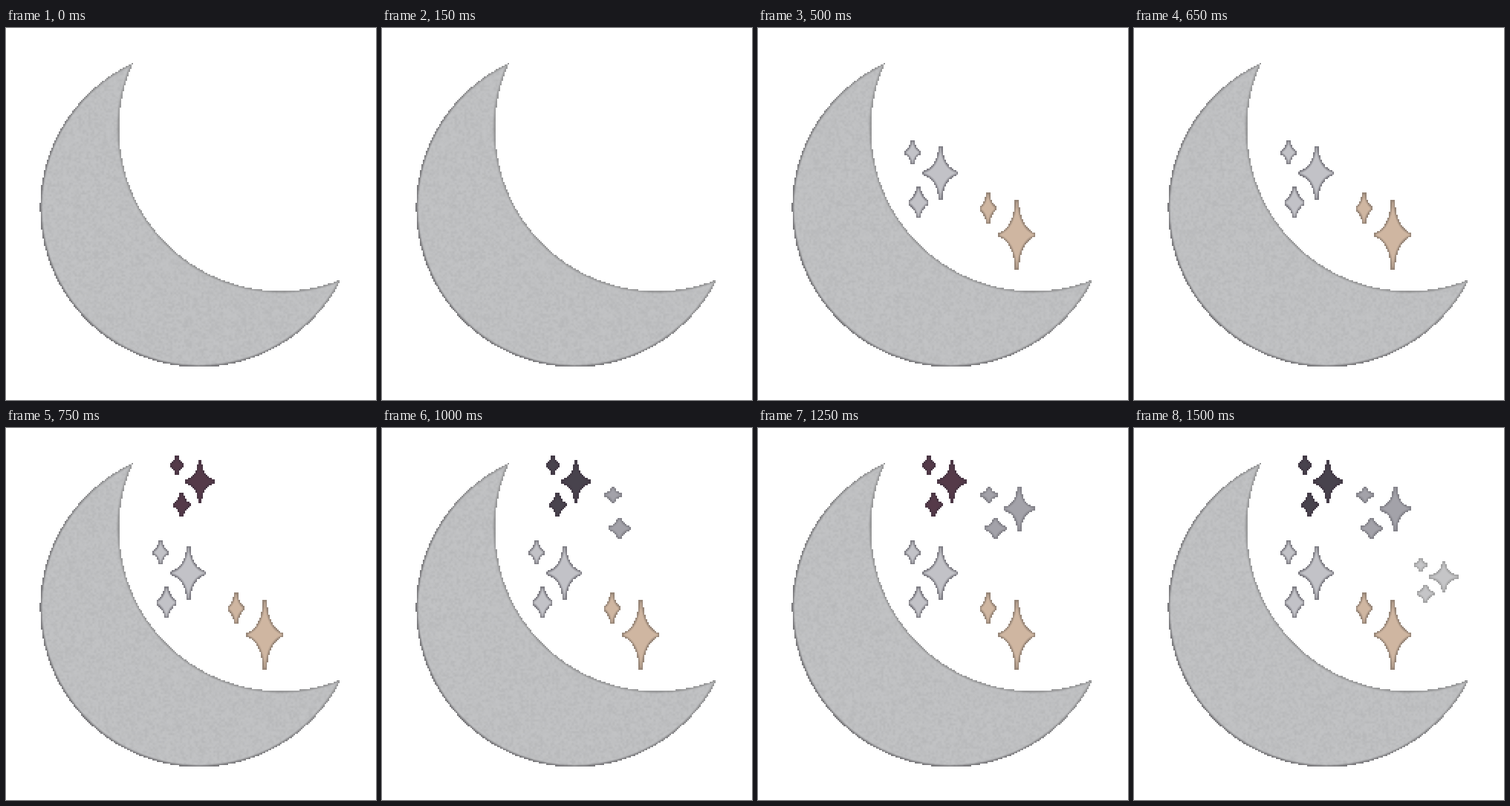
An HTML page with a canvas for the animation above (1.75 s loop, 498 by 500 pixels).

```html
<!DOCTYPE html>
<html lang="en">
<head>
<meta charset="utf-8">
<title>Moon and stars</title>
<style>
html, body { margin: 0; width: 100%; height: 100%; overflow: hidden; background: #fff; }
canvas { display: block; }
</style>
</head>
<body>
<canvas id="sky" width="498" height="500"></canvas>
<script>
const sky = document.getElementById('sky');
const ctx = sky.getContext('2d');
const STEP = 250, STEPS = 7, CELL = 2;

// Paper-cut shapes have stepped edges: cover the path with square cells.
function stepped(path, x0, y0, x1, y1) {
  const cells = new Path2D();
  const snap = v => Math.floor(v / CELL) * CELL - 1;
  for (let y = snap(y0); y <= y1; y += CELL) {
    for (let x = snap(x0); x <= x1; x += CELL) {
      if (ctx.isPointInPath(path, x + 1, y + 1)) cells.rect(x, y, CELL, CELL);
    }
  }
  return cells;
}

// Four blunt points joined by hollow sides; a larger pinch gives a fuller star.
function star(x, y, w, h, pinch) {
  const path = new Path2D();
  const tip = 2.5, cx = pinch * w, cy = pinch * h;
  path.moveTo(x + tip, y - h);
  for (const [sx, sy] of [[1, -1], [1, 1], [-1, 1], [-1, -1]]) {
    const side = [x + sx * w, y + sy * tip], end = [x + sx * tip, y + sy * h];
    const [from, to] = sx * sy < 0 ? [end, side] : [side, end];
    path.lineTo(...from);
    path.quadraticCurveTo(x + sx * cx, y + sy * cy, ...to);
  }
  path.closePath();
  return { path, cells: stepped(path, x - w, y - h, x + w, y + h) };
}

// A large star with small companions to its upper and lower left.
function cluster({ step, delay = 0, x, y, w, h, spreadX = w, spreadY = h, small = 2, ...look }) {
  const add = (at, ...shape) => ({ step: at, ...look, ...star(...shape) });
  const list = [add(step + delay, x, y, w, h, 0.2)];
  for (let i = 0; i < small; i++) {
    const dx = 1.56 - 0.33 * i, dy = 1.87 * i - 0.77, size = 0.45 + 0.13 * i;
    list.push(add(step, x - dx * spreadX, y + dy * spreadY, size * spreadX, size * spreadY, 0.36));
  }
  return list;
}

const plum = step => step % 2 ? '#553a49' : '#48434d';
const stars = [
  { step: 1, x: 245.5, y: 195, w: 24, h: 36, fill: '#c2c2c7', edge: '#3c3843' },
  { step: 2, x: 348.5, y: 278, w: 25, h: 46, small: 1, fill: '#cfb6a1', edge: '#62574f' },
  { step: 3, x: 261, y: 72, w: 20, h: 28.5, fill: plum, edge: '#40343f' },
  { step: 4, delay: 1, x: 351.5, y: 108.5, w: 21, h: 30, spreadX: 26, spreadY: 24, fill: '#a3a2a9', edge: '#66646b' },
  { step: 6, x: 417, y: 200, w: 20, h: 20.5, fill: '#c5c5c7', edge: '#808080' }
].flatMap(cluster);

const moonPath = new Path2D('M171 47A214 214 0 1 0 451 338A218 218 0 0 1 171 47Z');
const moon = { path: moonPath, cells: stepped(moonPath, 46, 46, 452, 456), fill: '#bfc0c2' };
// The rim is pale on the hollow side and dark on the round side.
moon.edge = ctx.createRadialGradient(369, 136, 214, 369, 136, 330);
moon.edge.addColorStop(0, '#777');
moon.edge.addColorStop(1, '#39373b');

// Soft paper grain, one seeded sheet per step.
function grain(seed) {
  const size = 160;
  const sheet = document.createElement('canvas');
  sheet.width = sheet.height = size;
  const g = sheet.getContext('2d');
  const image = g.createImageData(size, size);
  let s = seed * 7919 + 17;
  for (let i = 0; i < image.data.length; i += 4) {
    s = (s * 1664525 + 1013904223) % 2 ** 32;
    const r = s / 2 ** 32 - 0.5;
    image.data.fill(r > 0 ? 255 : 70, i, i + 3);
    image.data[i + 3] = Math.abs(r) * 32;
  }
  g.putImageData(image, 0, 0);
  return sheet;
}
const sheets = Array.from({ length: STEPS }, (_, i) => grain(i));

function paint({ path, cells, fill, edge }, step, sheet) {
  ctx.save();
  ctx.clip(cells);
  ctx.fillStyle = typeof fill === 'function' ? fill(step) : fill;
  ctx.fillRect(0, 0, sky.width, sky.height);
  if (sheet) ctx.drawImage(sheet, 40, 40, 420, 420);
  ctx.strokeStyle = edge;
  for (let width = 7; width > 1; width -= 2) {
    ctx.lineWidth = width;
    ctx.globalAlpha = 0.9 / width;
    ctx.stroke(path);
  }
  ctx.restore();
}

function draw(step) {
  ctx.clearRect(0, 0, sky.width, sky.height);
  paint(moon, step, sheets[step]);
  for (const s of stars) if (s.step <= step) paint(s, step);
}

const begin = performance.now();
let shown = -1;
function tick() {
  const step = Math.floor((performance.now() - begin) / STEP) % STEPS;
  if (step !== shown) draw(shown = step);
  requestAnimationFrame(tick);
}
tick();
</script>
</body>
</html>
```
